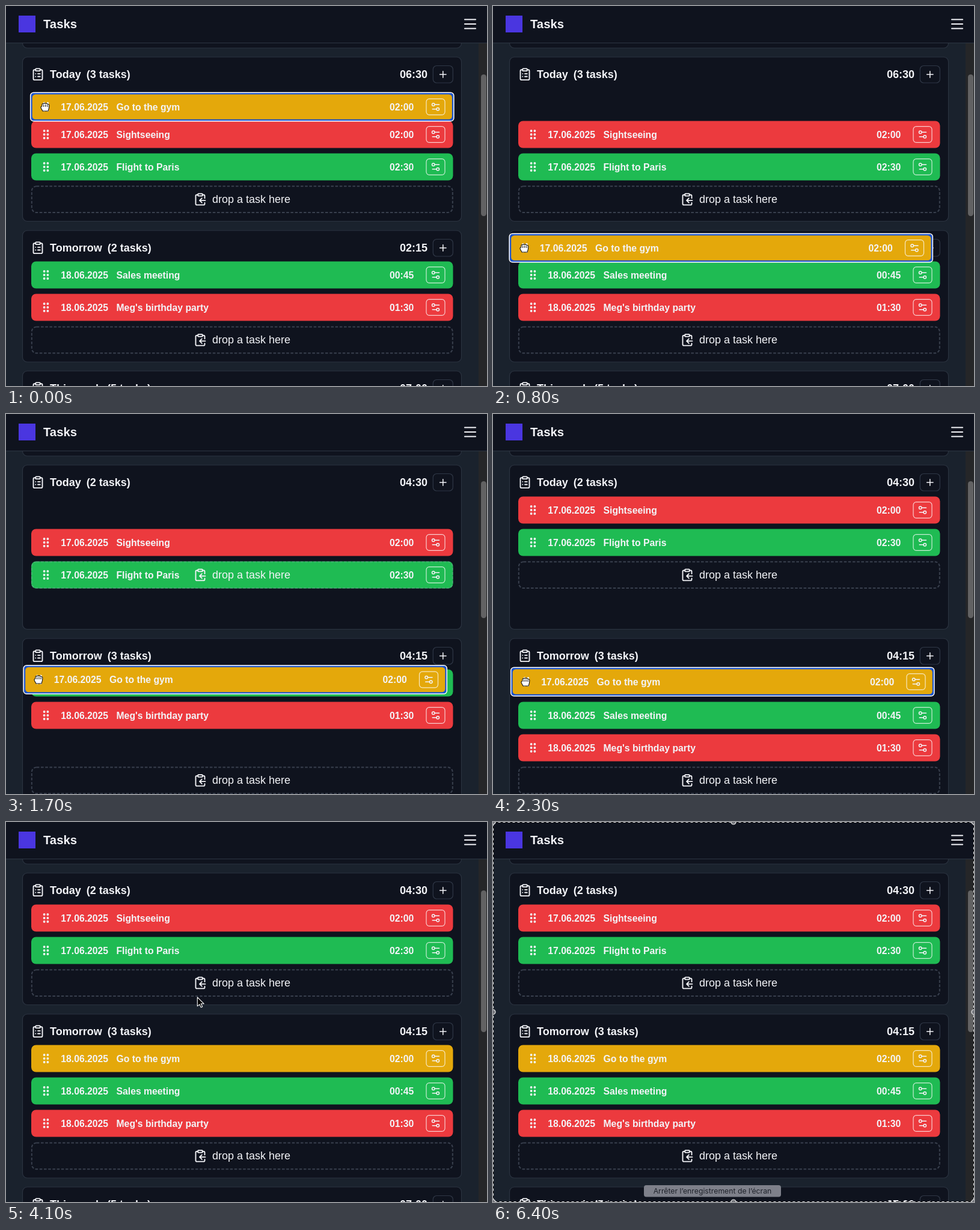
Recreate the animation shown at these times as an HTML page. Size 800 by 633 pixels, loop 6.5 s.

```html
<!DOCTYPE html>
<html lang="en">
<head>
<meta charset="utf-8">
<title>Tasks</title>
<style>
  html, body { margin: 0; width: 100%; height: 100%; overflow: hidden; background: #1a222d; }
  svg { display: block; width: 800px; height: 633px; font-family: "Liberation Sans", Arial, sans-serif; fill: #f3f4f8; }
  .bold { font-weight: bold; }
  .line { fill: none; stroke: #f3f4f8; stroke-linecap: round; stroke-linejoin: round; }
</style>
</head>
<body>
<svg id="stage" viewBox="0 0 800 633"></svg>
<script>
const LOOP = 6500, STEP = 100, SLOT = 54;
const ENTER = 1700, RELEASE = 2300, SETTLED = 2500, SELECT = 5500;
const RED = '#ec3a3e', GREEN = '#1fbb53', YELLOW = '#e4a80b', CARD = '#0f131e';

const ICONS = {
  list: '<rect x="8" y="2" width="8" height="4" rx="1"/><path d="M16 4h2a2 2 0 0 1 2 2v14a2 2 0 0 1-2 2H6a2 2 0 0 1-2-2V6a2 2 0 0 1 2-2h2M12 11h4M12 16h4M8 11h.01M8 16h.01"/>',
  drop: '<rect x="8" y="2" width="8" height="4" rx="1"/><path d="M8 4H6a2 2 0 0 0-2 2v14a2 2 0 0 0 2 2h12a2 2 0 0 0 2-2v-2M16 4h2a2 2 0 0 1 2 2v4M21 14H11M15 10l-4 4 4 4"/>',
  plus: '<path d="M5 12h14M12 5v14"/>',
  sliders: '<path d="M20 7h-9M14 17H5"/><circle cx="17" cy="17" r="3"/><circle cx="7" cy="7" r="3"/>'
};

// [time, x, y]
const CURSOR_PATH = [[0, 65, 168], [400, 56, 326], [800, 52, 403], [1700, 54, 442], [2300, 54, 446],
  [2700, 64, 420], [3100, 91, 344], [4000, 300, 302], [5100, 545, 278], [5500, 700, 20]];
const DRAG_PATH = [[0, 0, 168], [400, -8, 322], [800, -13.5, 403], [1700, -11.5, 442.5],
  [RELEASE, -11, 446], [SETTLED, 0, 448]];

function along(path, t) {
  const i = path.findIndex(p => p[0] > t);
  if (i < 0) return path[path.length - 1].slice(1);
  const [a, b] = [path[i - 1], path[i]];
  const k = (t - a[0]) / (b[0] - a[0]);
  return [1, 2].map(n => a[n] + (b[n] - a[n]) * k);
}

function ease(t, start, end) {
  const k = Math.min(1, Math.max(0, (t - start) / (end - start)));
  return 1 - (1 - k) ** 3;
}

const rect = (x, y, w, h, r, attrs) =>
  `<rect x="${x}" y="${y}" width="${w}" height="${h}" rx="${r}" ${attrs}/>`;

const text = (x, y, size, content, attrs = 'class="bold"') =>
  `<text x="${x}" y="${y}" font-size="${size}" ${attrs}>${content}</text>`;

const icon = (name, cx, cy, size) =>
  `<g class="line" stroke-width="2" transform="translate(${cx - size / 2} ${cy - size / 2}) scale(${size / 24})">${ICONS[name]}</g>`;

function row(y, color, date, title, time, dx = 0, focused = false) {
  let dots = '';
  for (const x of [63.6, 69.4])
    for (const dy of [-6, 0, 6]) dots += `<circle cx="${x}" cy="${dy}" r="1.9"/>`;
  const ring = focused
    ? rect(42, -22.5, 701.5, 45, 7, 'fill="none" stroke="#1d55cf" stroke-width="3.4"') +
      rect(40.7, -23.8, 704.1, 47.6, 5, 'fill="none" stroke="#fff" stroke-width="1.5"')
    : '';
  return `<g transform="translate(${dx} ${y})">` +
    rect(42, -22.5, 701.5, 45, 8, `fill="${color}"`) + ring + dots +
    text(91.3, 5.6, 15.75, date + '.06.2025') +
    text(183.5, 5.6, 15.75, title) +
    text(678.3, 5.6, 15.75, time, 'class="bold" text-anchor="end"') +
    rect(699, -13.3, 31, 26.6, 5, 'fill="none" stroke="#fff" stroke-opacity=".75" stroke-width="1.2"') +
    icon('sliders', 714.5, 0, 18) + '</g>';
}

function card(top, bottom, title, count, time) {
  const y = top + 29;
  return rect(27.5, top, 730, bottom - top, 8, `fill="${CARD}" stroke="#2b3340" stroke-width="1.2"`) +
    icon('list', 53, y - .2, 22.5) +
    text(73, y + 6.2, 18, `${title}<tspan dx="9">(${count} tasks)</tspan>`) +
    text(701, y + 6.2, 18, time, 'class="bold" text-anchor="end"') +
    rect(710.3, y - 14.5, 33, 28.5, 6, 'fill="none" stroke="#2f3746" stroke-width="1.2"') +
    icon('plus', 726.8, y, 18);
}

const dropZone = y =>
  rect(42.8, y - 21.8, 700, 43.8, 8, 'fill="none" stroke="#9aa5bb" stroke-opacity=".3" stroke-width="2" stroke-dasharray="4.6 2.6"') +
  icon('drop', 323, y, 22.5) + text(343, y + 6, 18, 'drop a task here', '');

function header() {
  return rect(0, 0, 800, 61, 0, `fill="${CARD}"`) +
    rect(0, 61, 800, 1.1, 0, 'fill="#2b3340"') +
    rect(21, 16, 28, 28, 0, 'fill="#4a36e0"') +
    text(62, 36.8, 20.25, 'Tasks') +
    '<path class="line" stroke-width="2.2" d="M763 22.5h18M763 30h18M763 37.5h18"/>';
}

function cursor(t) {
  const [x, y] = along(CURSOR_PATH, t);
  const inZone = (y > 138 && y < 291) || (y > 372 && y < 579);
  let shape;
  if (t < SETTLED) {
    shape = '<path d="M-4 7L-6.5 2.5Q-8-1-5-1V-4Q-4.500-6-2.500-5Q-1-7 .7-5.500Q3-6.500 4-4.500Q7-5 6.800-2Q7 2 5 7Z"/><path d="M-2.300-3.500v3.500M.9-4v4M4-3.500v3.500"/>';
  } else if (inZone) {
    shape = '<path d="M-3 8L-7 2.500Q-7.500.5-5 1L-4 2L-5.500-4Q-5-6-3.500-4.500L-2.500-1V-6Q-1.500-8-.3-6L0-1L1.500-6.500Q3-7.500 3.500-5.500L3-.5L5-4Q7-5 6.800-3Q6 3 4.500 8Z"/>';
  } else if (y > 330 && y < 366 && x < 245) {
    const beam = 'd="M-4-8.500Q0-8.500 0-6Q0-8.500 4-8.500M0-6V6M-4 8.500Q0 8.500 0 6Q0 8.500 4 8.500M-2 2.500H2"';
    shape = `<path ${beam} fill="none" stroke="#fff" stroke-width="3"/><path ${beam} fill="none" stroke="#000" stroke-width="1.2"/>`;
  } else {
    shape = '<path d="M-4-8V7L-.5 4L2 9L4.500 8L2 3H7Z" fill="#000" stroke="#fff"/>';
  }
  return `<g transform="translate(${x} ${y})" fill="#fff" stroke="#111" stroke-width="1.1" stroke-linejoin="round">${shape}</g>`;
}

function selection() {
  const border = (color, dash) =>
    rect(.5, .5, 799, 632, 0, `fill="none" stroke="${color}" stroke-width="1.2" ${dash}`);
  let handles = '';
  for (const x of [0, 400, 800])
    for (const y of [0, 316.5, 633])
      if (x !== 400 || y !== 316.5)
        handles += `<circle cx="${x}" cy="${y}" r="4" fill="#74767c" stroke="#f0f0f0" stroke-width="1.2"/>`;
  return border('#111', '') + border('#e8e8e8', 'stroke-dasharray="4 4"') + handles +
    rect(251, 605, 228, 19.5, 4, 'fill="#7e808a"') +
    text(365, 618.8, 12.25, 'Arrêter l’enregistrement de l’écran',
      'text-anchor="middle" fill="#1f222b" font-family="Inter, sans-serif"');
}

function draw(t) {
  const moved = t >= ENTER, settled = t >= SETTLED;
  const shift = SLOT * ease(t, ENTER, ENTER + 300);
  const swap = SLOT * (ease(t, 100, 300) - ease(t, 450, 700));
  const todayEnd = settled ? 304.5 : 358.5;
  const nextTop = todayEnd + 15.5;
  const nextEnd = moved && !settled ? 647 : 593;
  const lift = settled ? SLOT : 0;
  const [dx, dragY] = along(DRAG_PATH, t);
  const stretched = moved && !settled;

  return rect(0, 0, 800, 633, 0, 'fill="#1a222d"') +
    rect(27.5, 0, 730, 70, 8, `fill="${CARD}" stroke="#2b3340" stroke-width="1.2"`) +
    card(85, todayEnd, 'Today', moved ? 2 : 3, moved ? '04:30' : '06:30') +
    row(214 - swap - shift, RED, 17, 'Sightseeing', '02:00') +
    row(268 - shift, GREEN, 17, 'Flight to Paris', '02:30') +
    dropZone(moved ? 268 : 322) +
    card(nextTop, nextEnd, 'Tomorrow', moved ? 3 : 2, moved ? '04:15' : '02:15') +
    row(448 + shift - lift, GREEN, 18, 'Sales meeting', '00:45') +
    row(502 + shift - lift, RED, 18, "Meg's birthday party", '01:30') +
    dropZone(nextEnd - 36.7) +
    card(nextEnd + 15, nextEnd + 300, 'This week', 5, '07:00') +
    (settled
      ? row(394, YELLOW, 18, 'Go to the gym', '02:00')
      : row(dragY, YELLOW, 17, 'Go to the gym', '02:00', dx, true)) +
    rect(786, 61, 14, 572, 0, 'fill="#252628"') +
    rect(790, stretched ? 112 : 114, 9, stretched ? 228 : 236, 4.5, 'fill="#626263"') +
    header() +
    (t < SELECT ? cursor(t) : selection());
}

const stage = document.getElementById('stage');
const start = performance.now();
let shown = -1;

function tick() {
  const t = Math.floor(((performance.now() - start) % LOOP) / STEP) * STEP;
  if (t !== shown) stage.innerHTML = draw(shown = t);
  requestAnimationFrame(tick);
}
tick();
</script>
</body>
</html>
```
